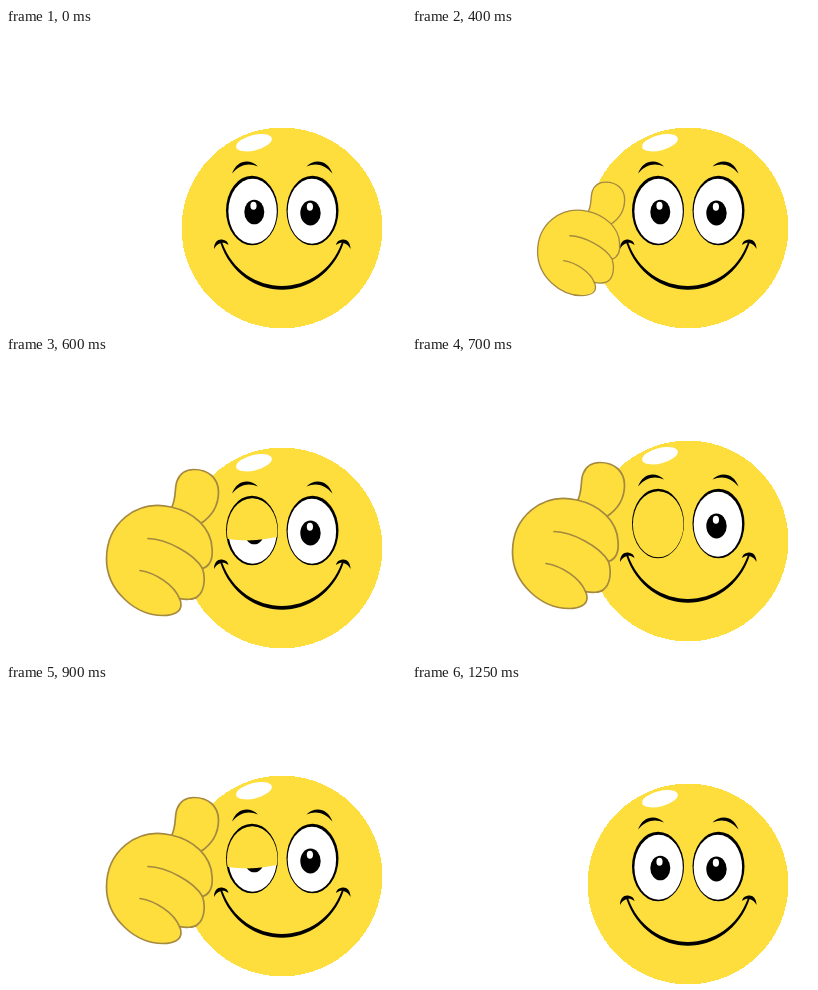
Write an HTML page that moves like this. It is 400 px wide and 300 px high and loops after 1600 ms.

```html
<!DOCTYPE html>
<html lang="en">
<head>
<meta charset="utf-8">
<title>Winking thumbs up</title>
<style>
  html, body { margin: 0; width: 100%; height: 100%; overflow: hidden; background: #fff; }
  svg { display: block; width: 400px; height: 300px; }
  .skin { fill: #fdde3d; }
  .white { fill: #fff; }
  #hand path { stroke: #a5893f; stroke-width: 1.7; stroke-linecap: round; stroke-linejoin: round; }
  #hand .crease { fill: none; }
</style>
</head>
<body>
<svg viewBox="0 0 400 300">
  <defs>
    <clipPath id="lidClip"><path id="lidEdge"/></clipPath>
    <!-- left half features, mirrored for the right -->
    <g id="side">
      <path d="M226 145.5C231 131.500 244 130.500 252 138.500C243 134.500 234 136 226 145.500Z"/>
      <path d="M208 221C208 214 212 211 216 211.500C220 212 222 214 222.500 217C219 214.500 217 214.500 215 215C211.500 216 209.500 218 208 221Z"/>
      <ellipse cx="246" cy="182.500" rx="26" ry="34.800"/>
      <ellipse class="white" cx="246.600" cy="183.200" rx="24.200" ry="32.500"/>
    </g>
  </defs>
  <g id="figure">
    <circle class="skin" cx="276" cy="200" r="100.400" shape-rendering="crispEdges"/>
    <ellipse class="white" cx="248" cy="114.700" rx="18.300" ry="7.700" transform="rotate(-14 248 114.700)"/>
    <use href="#side"/>
    <use href="#side" transform="matrix(-1 0 0 1 552.500 0)"/>
    <path d="M214 214C235 277.500 317 277.500 338 214L336 214C315 272.500 237 272.500 216 214Z"/>
    <ellipse cx="248.300" cy="184" rx="10" ry="12.300"/>
    <ellipse class="white" cx="247.500" cy="177.700" rx="3.100" ry="4"/>
    <ellipse cx="304.500" cy="185" rx="10.200" ry="12.400"/>
    <ellipse class="white" cx="303.900" cy="178.700" rx="3.100" ry="4"/>
    <ellipse class="skin" cx="246.200" cy="183.200" rx="25.300" ry="33" clip-path="url(#lidClip)"/>
    <g id="hand" class="skin">
      <path d="M165 161C171 150 168 141 171 133C174 125 180 121.500 188 121.500C202 121.500 212.500 130 212.500 144C212.500 160 205 169 194 176Z"/>
      <path d="M165 159C130 151 100.500 176 100.500 211C100.500 243 130 267.500 157 267.500C169 267.500 175 263 175 257Q175 253 173.500 250.500C180 252 188 251.500 191 249C198 244 200 232 196.500 220.500C204 218 207 210 206 200C205 180 188 164 165 159Z"/>
      <path class="crease" d="M142 190.500C160 191 188 205 196.500 220.500"/>
      <path class="crease" d="M134 222.500C150 225 168 237 173.500 250.500"/>
    </g>
  </g>
</svg>
<script>
  const LOOP = 1600, STEP = 50, PEAK = 16;
  const $ = id => document.getElementById(id);
  const scales = [0.3, 0.56, 0.777, 0.908, 1];

  function draw(now) {
    const tick = Math.floor(now % LOOP / STEP);
    // Rise for eleven poses, then return more quickly through the lower eight.
    const pose = tick <= PEAK ? tick - 6 : 24 - tick;
    const wink = Math.max(0, pose - 4);
    const size = scales[Math.min(pose, 4)] || 0;
    const lift = Math.round(wink * 23 / 6);
    const lid = 147 + wink * 21.5;

    $("figure").setAttribute("transform", `translate(0 ${-lift})`);
    $("hand").setAttribute("display", size ? "inline" : "none");
    $("hand").setAttribute("transform", `translate(213 268) scale(${size}) translate(-213 -268)`);
    $("lidEdge").setAttribute("d", wink ? `M215 140H278V${lid - 3}Q248 ${lid + 6} 215 ${lid}Z` : "");
    requestAnimationFrame(() => draw(performance.now() - start));
  }

  const start = performance.now();
  draw(0);
</script>
</body>
</html>
```
